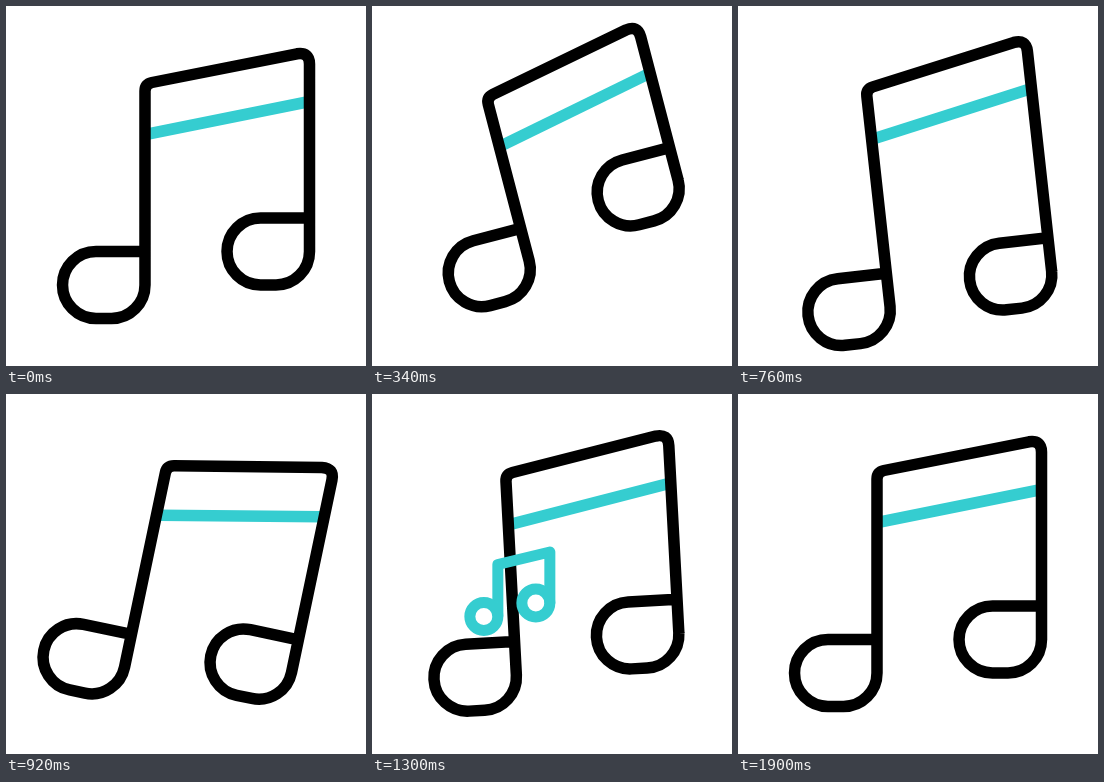
Animation, 360 px wide and 360 px high, one loop 2 s. Source, as an HTML page:

```html
<!DOCTYPE html>
<html lang="en">
<head>
<meta charset="utf-8">
<title>Swinging music note</title>
<style>
  html, body { margin: 0; width: 100%; height: 100%; overflow: hidden; background: #fff; }
  svg { display: block; width: 100vw; height: 100vh; }
</style>
</head>
<body>
<svg viewBox="0 0 360 360" fill="none" stroke-linejoin="round">
  <g id="note" stroke-width="11.5">
    <path id="bar" d="M142 128L301 96"/>
    <path id="outline" stroke="#000"/>
  </g>
  <g id="small" stroke="#35cdd0" stroke-width="11">
    <path d="M229.5 268V216L281.5 203.5V255"/>
    <circle cx="215.5" cy="268" r="14"/>
    <circle cx="267.5" cy="254.5" r="14"/>
  </g>
</svg>
<script>
const LOOP = 2000;
const [note, bar, outline, small] =
  ['note', 'bar', 'outline', 'small'].map(id => document.getElementById(id));

// Smooth step from 0 to 1 between the times a and b.
function smooth(t, a, b) {
  const u = Math.min(1, Math.max(0, (t - a) / (b - a)));
  return u * u * (3 - 2 * u);
}

// Damped swing around upright, first upright at 793 ms, then every 290 ms.
function ring(t) {
  const u = (t - 793) / 290;
  return u < 3 ? 17 * 0.46 ** u * Math.sin(Math.PI * u) : 0;
}

// Wind up to the first peak of the swing, then let it ring out.
const PEAK = 626;
const swing = t => t < PEAK ? ring(PEAK) * smooth(t, 0, PEAK) : ring(t);

// A head slides up its stem, drops below its place and settles.
const slide = (t, up, down) =>
  -up * smooth(t, 0, 350) + (up + down) * smooth(t, 495, 770) - down * smooth(t, 770, 1000);

// Teardrop head hanging on a stem at x, its top edge at y.
const head = (x, y) =>
  `M${x} ${y}h-49a33.5 33.5 0 0 0 0 67h15.5a33.5 33.5 0 0 0 33.5-33.5`;

function draw(t) {
  const leftY = 245.5 + slide(t, 32.5, 18);
  const rightY = 212 + slide(t, 39.5, 34);
  outline.setAttribute('d', head(139, leftY) +
    `V85Q139 78 146 76.5L291 47.8Q303.5 46 303.5 58V${rightY + 34}` + head(303.5, rightY));
  note.setAttribute('transform', `rotate(${swing(t)} 180 180)`);
  bar.setAttribute('stroke', t >= 100 && t < 300 ? '#cdcdcd' : '#35cdd0');

  // The small note rises steadily while curving to the left.
  const age = t - 1080;
  const x = -162 * Math.sin(Math.PI / 2 * age / 500);
  small.setAttribute('transform', `translate(${x} ${-0.206 * age})`);
  small.style.display = t >= 1060 && t < 1900 ? '' : 'none';
}

const start = performance.now();
function tick() {
  draw((performance.now() - start) % LOOP);
  requestAnimationFrame(tick);
}
tick();
</script>
</body>
</html>
```
